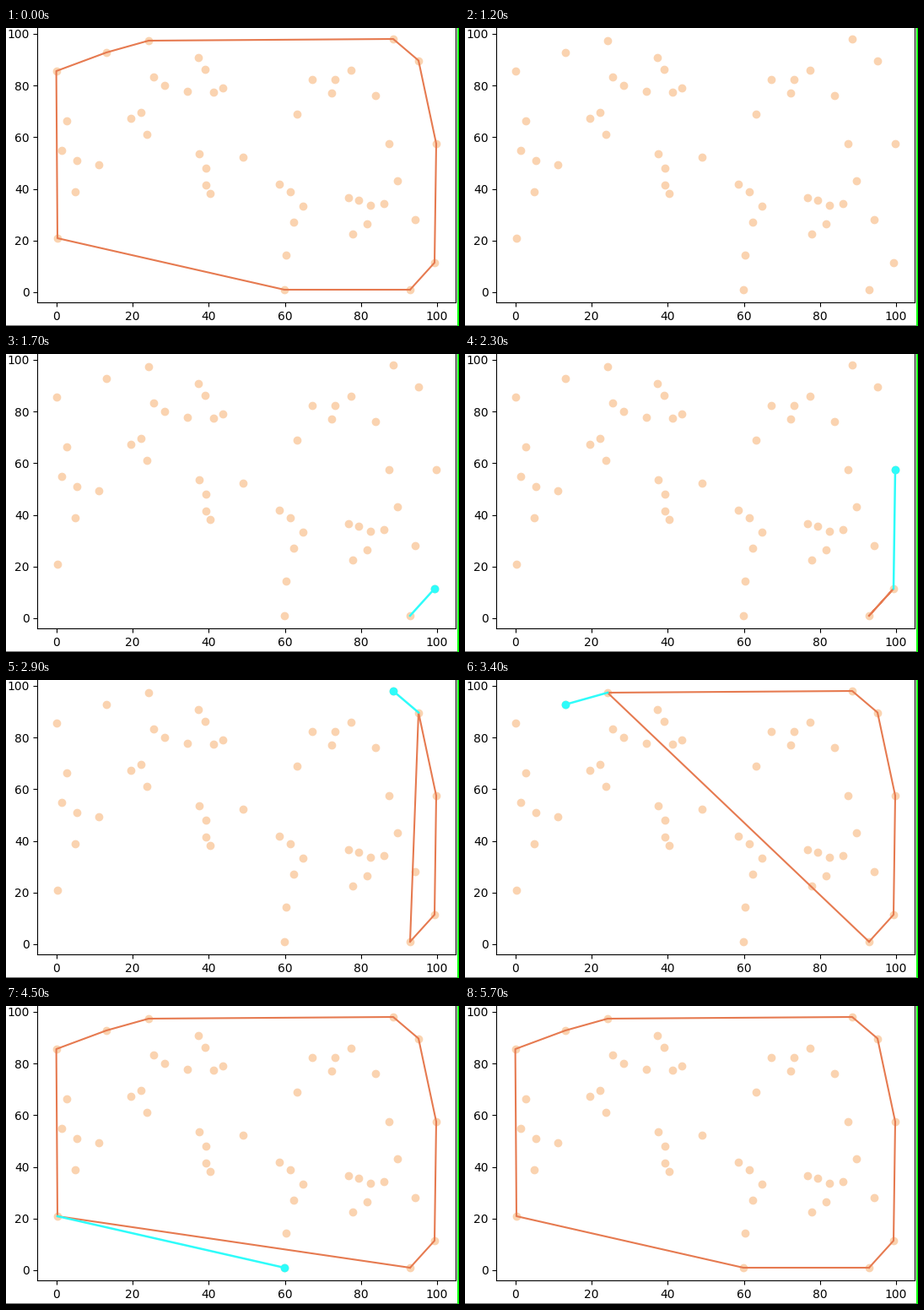
These frames come from a looping animation (537 px wide and 353 px high, 5.9 s). A matplotlib script:

```python
import numpy as np
import matplotlib.pyplot as plt
from matplotlib.animation import FuncAnimation
from matplotlib.patches import Rectangle

W, H, DPI = 537, 353, 100
STEP, FRAMES = 100, 59

PEACH, ORANGE, CYAN = "#fad3b0", "#e67a50", "#2efcfa"

# Axes box in pixels, y measured downwards; the top edge lies off the stage
LEFT, RIGHT, TOP, BOTTOM = 37.4, 533.4, -1.8, 325.4
ORIGIN = np.array([60, 312.9])
UNIT = np.array([4.51, -3.06])

# Hull corners in walking order, starting at the lowest point
HULL = np.array([(479, 310), (508, 278), (510, 137), (489, 38.5), (459, 13),
                 (169, 15), (119, 29), (59.6, 51), (61, 249), (330, 310)])

# Inner dots gather loosely around these places
HUBS = [(78, 140), (160, 130), (243, 42), (242, 170),
        (370, 55), (470, 145), (352, 235), (408, 205)]
DOTS_PER_HUB, SPREAD, GAP = 5, (19, 34), 11

CLEAR, DONE = 1200, 5700
EDGE_TIMES = [1700, 2200, 2600, 2800, 3100, 3300, 3600, 3900, 4500, 4900]


def to_data(pixels):
    return (np.asarray(pixels, float) - ORIGIN) / UNIT


def inside(p):
    """True if a pixel lies within the hull, clear of its edges."""
    ex, ey = (np.roll(HULL, -1, axis=0) - HULL).T
    dx, dy = (p - HULL).T
    return np.all((ey * dx - ex * dy) / np.hypot(ex, ey) > GAP / 2)


def scatter_dots(rng):
    dots = list(HULL)
    for hub in HUBS:
        goal = len(dots) + DOTS_PER_HUB
        while len(dots) < goal:
            p = rng.normal(hub, SPREAD)
            if inside(p) and np.hypot(*(p - dots).T).min() > GAP:
                dots.append(p)
    return np.array(dots)


def strip(x, y, w, h, color):
    """Fill a rectangle given in pixels from the bottom left."""
    fig.add_artist(Rectangle((x / W, y / H), w / W, h / H, lw=0, fc=color,
                             transform=fig.transFigure, antialiased=False))


fig = plt.figure(figsize=(W / DPI, H / DPI), dpi=DPI, facecolor="white")
ax = fig.add_axes([LEFT / W, 1 - BOTTOM / H,
                   (RIGHT - LEFT) / W, (BOTTOM - TOP) / H])
(x0, y0), (x1, y1) = to_data([(LEFT, BOTTOM), (RIGHT, TOP)])
ticks = range(0, 101, 20)
ax.set(xlim=(x0, x1), ylim=(y0, y1), xticks=ticks, yticks=ticks)

strip(0, 0, W, 1, "#777777")
strip(W - 2, 0, 2, H, "#00ff00")

hull = to_data(HULL)
ax.scatter(*to_data(scatter_dots(np.random.default_rng(4))).T, color=PEACH)
outline, = ax.plot([], [], color=ORANGE, lw=1.5, zorder=2)
edge, = ax.plot([], [], color=CYAN, lw=1.8, zorder=3)
head = ax.scatter([], [], color=CYAN, zorder=4)

NOTHING = np.empty((0, 2))


def closed(count):
    return np.vstack([hull[:count], hull[:1]]) if count > 1 else NOTHING


def draw(i):
    t = i * STEP
    path, active = NOTHING, NOTHING
    if t < CLEAR or t >= DONE:
        path = closed(len(hull))
    elif t >= EDGE_TIMES[0]:
        k = sum(t >= start for start in EDGE_TIMES) - 1
        path = closed(k + 1)
        active = hull[[k, (k + 1) % len(hull)]]
    outline.set_data(path[:, 0], path[:, 1])
    edge.set_data(active[:, 0], active[:, 1])
    head.set_offsets(active[1:])
    return outline, edge, head


anim = FuncAnimation(fig, draw, frames=FRAMES, interval=STEP,
                     repeat=True, repeat_delay=0, blit=False)
plt.show()
```
